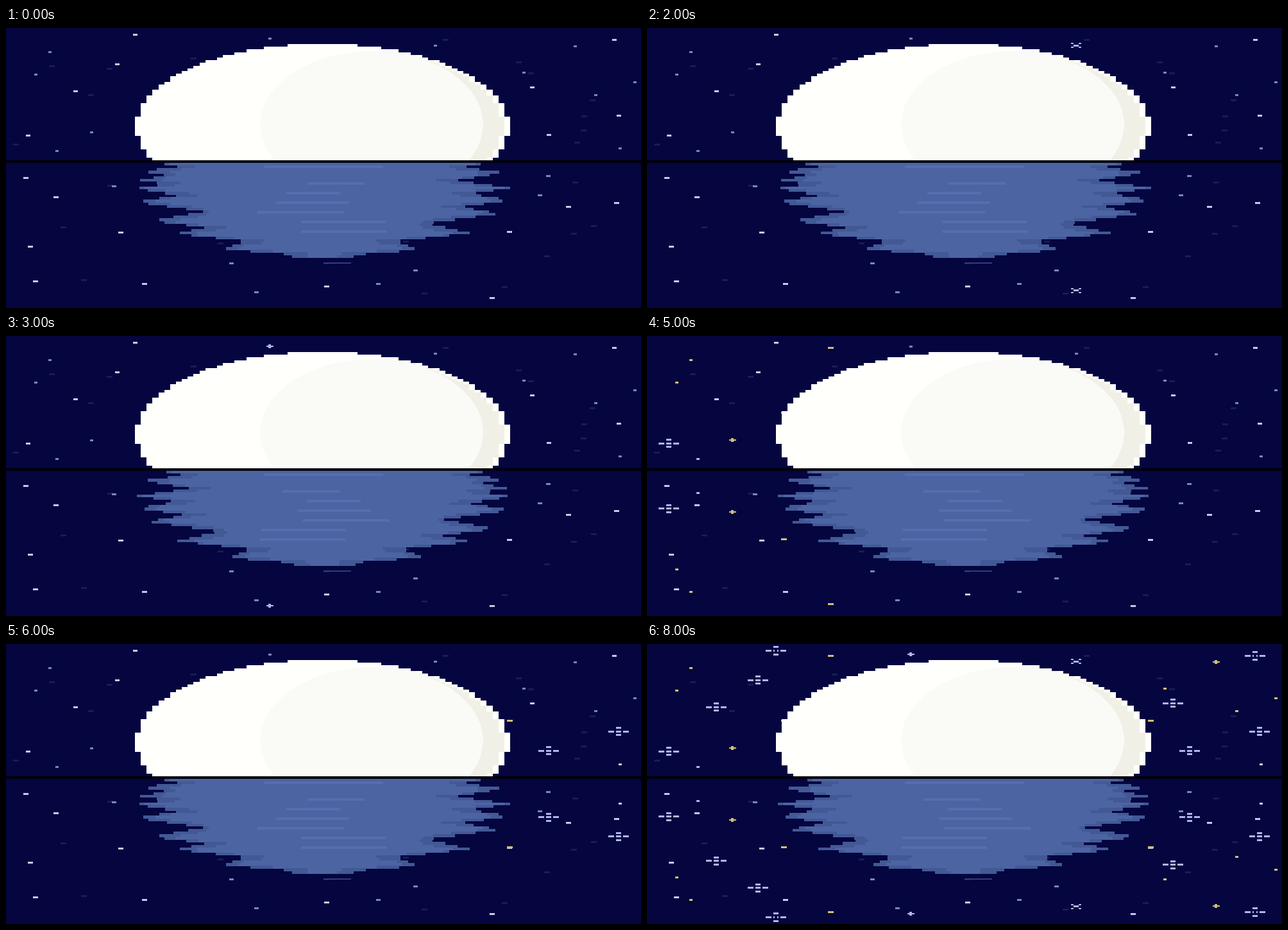
These frames come from a looping animation (990x436 px, 9 s). An HTML page:

```html
<!DOCTYPE html>
<html lang="en">
<head>
<meta charset="utf-8">
<title>Moonrise over water</title>
<style>
  html, body { margin: 0; width: 990px; height: 436px; overflow: hidden; background: #050540; }
  svg { display: block; }
</style>
</head>
<body>
<svg id="stage" width="990" height="436" viewBox="0 0 990 436" shape-rendering="crispEdges"></svg>
<script>
const NS = 'http://www.w3.org/2000/svg';
const NIGHT = '#050540', LILAC = '#b0b4ee', GOLD = '#d3bf72';
const BRIGHT = '#c6cbea', MEDIUM = '#7d84be', DIM = '#1a1b55';
const HORIZON = 206, CENTER = 493.5;
const stage = document.getElementById('stage');

function add(parent, tag, attrs = {}) {
  const el = document.createElementNS(NS, tag);
  for (const key in attrs) el.setAttribute(key, attrs[key]);
  parent.appendChild(el);
  return el;
}
const group = () => add(stage, 'g');
const rect = (g, x, y, width, height, fill) => add(g, 'rect', { x, y, width, height, fill });
const dash = (g, x, y, w, h, fill) => rect(g, x - w / 2, y - h / 2, w, h, fill);

let seed = 7;
function random(from, to) {
  seed = seed * 16807 % 2147483647;
  return from + (to - from) * seed / 2147483647;
}

const shapes = {
  big(g, x, y, hollow) {
    if (hollow) dash(g, x, y, 9, 6, NIGHT);
    for (const dx of [-11.5, 11.5]) dash(g, x + dx, y, 9, 3, LILAC);
    for (const dy of hollow ? [-6, 6] : [-5.5, 0, 5.5]) dash(g, x, y + dy, 8, 3, LILAC);
    if (hollow) for (const dx of [-3, 3]) dash(g, x + dx, y, 2, 3, LILAC);
  },
  cross(g, x, y) {
    for (const dx of [-6, 6]) for (const dy of [-3, 3]) dash(g, x + dx, y + dy, 4, 2, LILAC);
    dash(g, x, y, 8, 3, LILAC);
  },
  plus(g, x, y, color) {
    dash(g, x, y, 11, 2, color);
    dash(g, x, y, 4, 6, color);
  },
  bar(g, x, y) { dash(g, x, y, 9, 3, GOLD); },
  dot(g, x, y, color = GOLD) { dash(g, x, y, 5, 3, color); }
};

// Stars that twinkle during the listed seconds, both in the sky and mirrored in the water
const twinkles = [
  { on: [1, 7, 8], items: [['big', 201, 10, true], ['big', 173, 56], ['big', 108, 98]] },
  { on: [2, 7, 8], items: [['cross', 669, 27]] },
  { on: [3, 7, 8], items: [['plus', 411, 16, LILAC]] },
  { on: [4, 7, 8], items: [['big', 948, 18, true], ['big', 820, 92], ['plus', 887, 28, GOLD],
    ['dot', 807, 69], ['dot', 980, 84], ['dot', 919, 104]] },
  { on: [5, 7, 8], items: [['big', 34, 167], ['plus', 133, 162, GOLD], ['bar', 286, 18],
    ['dot', 46, 72], ['dot', 79, 191, LILAC], ['bar', 213, 119]] },
  { on: [6, 7, 8], items: [['big', 846, 166], ['big', 955, 136], ['bar', 785, 119],
    ['dot', 957, 187, BRIGHT]] },
  { on: [5, 8], items: [['dot', 68, 37]] }
];

const waterPoints = {
  bright: [[31, 233], [78, 263], [179, 318], [38, 340], [46, 394], [216, 398], [500, 402],
    [758, 420], [785, 317], [952, 272], [877, 278]],
  medium: [[845, 230], [390, 411], [168, 246], [351, 366], [638, 377], [580, 398], [832, 260]]
};

function scatterDim(g, count, top, bottom) {
  for (let i = 0; i < count; i++) dash(g, random(15, 975), random(top, bottom), 9, 3, DIM);
}

function drawSky() {
  const g = group();
  scatterDim(g, 22, 8, 196);
  for (const { items } of twinkles) for (const [shape, x, y] of items) {
    if (shape === 'big') dash(g, x, y, 7, 3, BRIGHT);
    else if (shape !== 'bar') dash(g, x, y, 5, 3, MEDIUM);
  }
}

function drawWater() {
  const g = group();
  scatterDim(g, 22, 230, 428);
  for (const [x, y] of waterPoints.bright) dash(g, x, y, 8, 3, BRIGHT);
  for (const [x, y] of waterPoints.medium) dash(g, x, y, 7, 3, MEDIUM);
  dash(g, 516.5, 366, 43, 2.5, '#303e78');
  return g;
}

function drawMoon() {
  const g = group(), cell = 9.14, row = 4.2;
  const clip = add(g, 'clipPath', { id: 'disc' });
  for (let y = 25; y < HORIZON; y += row) {
    const half = 289.5 * Math.sqrt(1 - ((y + row / 2 - 153) / 128) ** 2);
    const w = Math.round(half / cell) * cell;
    rect(g, CENTER - w, y, w * 2, row + .3, '#fffffc');
    rect(clip, CENTER - w, y, w * 2 - cell, row + .3, '#fff');
  }
  const shade = add(g, 'linearGradient', { id: 'shade' });
  add(shade, 'stop', { offset: 0, 'stop-color': '#fafaf6' });
  add(shade, 'stop', { offset: .6, 'stop-color': '#f1f0e7' });
  const face = add(g, 'g', { 'clip-path': 'url(#disc)' });
  rect(face, 570, 36, 216, 172, 'url(#shade)');
  add(face, 'ellipse', { cx: 570, cy: 150, rx: 174, ry: 114, fill: '#fafaf7' });
}

// Half-width of the reflection: an ellipse cut by notches midway between the wave tips
function waveEdge(y, tips) {
  const next = tips.findIndex(tip => tip > y);
  const gap = tips[next] - tips[next - 1];
  const f = (y - tips[next - 1]) / gap;
  const envelope = 293 * Math.sqrt(Math.max(0, 1 - ((y - 255) / 104) ** 2));
  return Math.max(48, envelope - 3.3 * gap * (1 - Math.abs(2 * f - 1)));
}

function drawReflection() {
  const g = group(), row = 4.1;
  const leftTips = [209, 223, 236, 250, 271, 300, 320, 344, 372];
  const rightTips = [209, 225, 249, 268, 289, 319, 345, 372];
  for (let i = 0; i < 36; i++) {
    const y = 210 + i * row, mid = y + row / 2;
    const left = CENTER - waveEdge(mid, leftTips);
    const right = CENTER + waveEdge(mid, rightTips);
    const inset = 8 + 30 * Math.abs(Math.sin(i * .7));
    rect(g, left, y, right - left, row + .3, '#425996');
    rect(g, left + inset, y, right - left - inset * 2, row + .3, '#4c64a2');
  }
  rect(g, 402, 213.5, 186, 4, '#566eae');
  for (let y = 240; y < 330; y += 15) rect(g, random(380, 470), y, random(75, 140), 4, '#566eae');
  return g;
}

rect(stage, 0, 0, 990, 436, NIGHT);
drawSky();
const waterStars = drawWater();
for (const t of twinkles) {
  t.group = group();
  for (const [shape, x, y, option] of t.items)
    for (const at of [y, 435.5 - y]) shapes[shape](t.group, x, at, option);
}
drawMoon();
const reflection = drawReflection();
rect(stage, 0, HORIZON, 990, 4, '#000008');

// The swell flips the water from left to right
const flip = (el, on) => el.setAttribute('transform', on ? 'translate(990 0) scale(-1 1)' : '');

function update(ms) {
  const second = Math.floor(ms / 1000) % 9;
  flip(reflection, [1, 3, 5, 8].includes(second));
  flip(waterStars, second === 1);
  for (const t of twinkles)
    t.group.setAttribute('visibility', t.on.includes(second) ? 'visible' : 'hidden');
}

const start = performance.now();
function tick() {
  update(performance.now() - start);
  requestAnimationFrame(tick);
}
tick();
</script>
</body>
</html>
```
